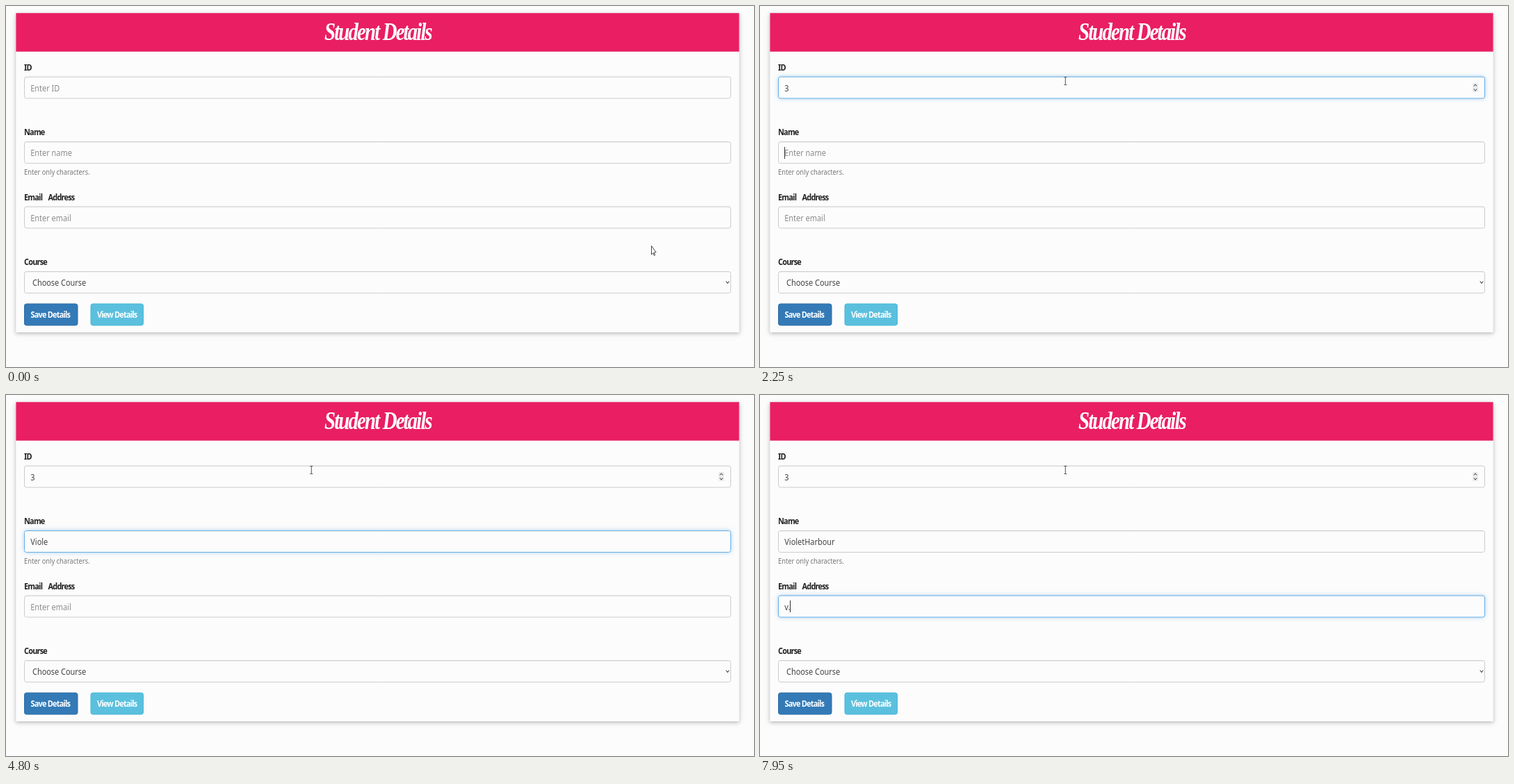
These frames come from a looping animation (1076x520 px, 8000 ms). An HTML page with a canvas:

```html
<!DOCTYPE html>
<html lang="en">
<head>
<meta charset="utf-8">
<title>Student Details</title>
<style>
html, body { margin: 0; width: 100%; height: 100%; overflow: hidden; background: #fcfcfc; }
canvas { display: block; }
</style>
</head>
<body>
<canvas id="stage" width="1076" height="520"></canvas>
<script>
const ctx = document.getElementById('stage').getContext('2d');
const LOOP = 8000, STEP = 50;
const PAGE = '#fcfcfc';
const SX = 0.78, SY = 0.94; // the whole page is shown slightly squeezed
const SANS = '"Noto Sans", "Open Sans", sans-serif';
const LEFT = 26, WIDTH = 1017;

const fields = [
  { label: 'ID', hint: 'Enter ID', top: 101.5, value: '3', times: [1750] },
  { label: 'Name', hint: 'Enter name', top: 195, value: 'VioletHarbour',
    times: [3300, 3550, 3750, 3900, 4350, 4950, 5300, 5600, 5800, 5900, 6000, 6200, 6300] },
  { label: 'Email Address', hint: 'Enter email', top: 288.5, value: 'v.', times: [7650, 7950] }
];

// field index, caret on, caret off
const carets = [
  [0, 900, 1400], [0, 1750, 2250],
  [1, 2250, 2800], [1, 3250, 4800], [1, 4950, 6600],
  [2, 6600, 7100], [2, 7600, LOOP]
];

function ramp(t, from, to) {
  const p = Math.min(1, Math.max(0, (t - from) / (to - from)));
  return p * p * (3 - 2 * p);
}

const mix = (a, b, p) => a + (b - a) * p;

function text(str, x, y, size, color, opt = {}) {
  ctx.save();
  ctx.translate(x, y);
  ctx.scale(SX, SY);
  ctx.font = `${opt.style || '400'} ${size}px ${opt.family || SANS}`;
  ctx.letterSpacing = opt.spacing || '0px';
  ctx.wordSpacing = opt.words || '0px';
  ctx.textAlign = opt.align || 'left';
  ctx.fillStyle = color;
  ctx.fillText(str, 0, 0);
  const width = ctx.measureText(str).width * SX;
  ctx.restore();
  return width;
}

function bold(str, x, y, color, words) {
  text(str, x, y, 14, color, { style: '600', spacing: '-1px', words });
}

const label = (str, y) => bold(str, LEFT, y, '#222', '8px');

function box(x, y, w, h, fill, stroke) {
  ctx.beginPath();
  ctx.roundRect(x + 0.5, y + 0.5, w - 1, h - 1, 3);
  ctx.fillStyle = fill;
  ctx.fill();
  ctx.strokeStyle = stroke;
  ctx.lineWidth = 1;
  ctx.stroke();
}

function shadow(color, blur, dy, paint) {
  ctx.save();
  ctx.shadowColor = color;
  ctx.shadowBlur = blur;
  ctx.shadowOffsetY = dy;
  paint();
  ctx.restore();
}

function line(points, color, width) {
  ctx.beginPath();
  points.forEach(([x, y]) => ctx.lineTo(x, y));
  ctx.strokeStyle = color;
  ctx.lineWidth = width;
  ctx.stroke();
}

function chevron(x, y, w, h, color) {
  line([[x - w, y], [x, y + h], [x + w, y]], color, 1.1);
}

function drawInput(top, glow) {
  if (glow > 0) {
    shadow(`rgba(102,175,233,${0.6 * glow})`, 6, 0, () => {
      ctx.beginPath();
      ctx.roundRect(LEFT + 0.5, top + 0.5, WIDTH - 1, 31, 3);
      ctx.fillStyle = PAGE;
      ctx.fill();
    });
  }
  const border = `rgb(${mix(204, 102, glow)},${mix(204, 175, glow)},${mix(204, 233, glow)})`;
  box(LEFT, top, WIDTH, 32, PAGE, border);
  ctx.fillStyle = 'rgba(0,0,0,0.04)';
  ctx.fillRect(LEFT + 2, top + 1, WIDTH - 4, 1);
}

function drawField(field, glow, caret, t) {
  const { top, value, times } = field;
  const typed = value.slice(0, times.filter(at => at <= t).length);
  label(field.label, top - 9);
  drawInput(top, glow);
  const base = top + 21.3;
  const width = text(typed, 35.3, base, 14, '#444');
  if (!typed) text(field.hint, 35.3, base, 14, '#8c8c8c');
  if (caret) {
    ctx.fillStyle = '#333';
    ctx.fillRect(Math.round(35.2 + width), Math.round(top + 7.5), 1, 17);
  }
}

function drawSpinner() {
  ctx.fillStyle = '#ececec';
  ctx.fillRect(1025, 111, 8, 13);
  chevron(1029, 115.5, 2.2, -2.5, '#555');
  chevron(1029, 119.5, 2.2, 2.5, '#555');
}

function drawCard() {
  const card = () => {
    ctx.fillStyle = PAGE;
    ctx.fillRect(14.4, 10, 1040.2, 460);
  };
  shadow('rgba(0,0,0,0.16)', 4.5, 2, card);
  shadow('rgba(0,0,0,0.12)', 9, 2, card);
  ctx.fillStyle = '#e91e63';
  ctx.fillRect(14.4, 10.2, 1040.2, 55.5);
  text('Student Details', 535, 49, 37, '#fff', {
    style: 'italic 700', family: '"Liberation Serif", serif', spacing: '-2.4px', align: 'center'
  });
}

function drawFooter() {
  label('Course', 372.5);
  drawInput(382, 0);
  text('Choose Course', 38, 403, 14, '#444');
  chevron(1038, 396.5, 2.3, 2.8, '#444');
  box(26, 428.5, 77.5, 32, '#337ab7', '#2e6da4');
  bold('Save Details', 35.5, 448.8, '#fff');
  box(121.5, 428.5, 76.5, 32, '#5bc0de', '#46b8da');
  bold('View Details', 131, 448.8, '#fff');
}

function drawArrow(x, y) {
  const shape = [[0, 0], [0, 12.6], [2.3, 10.2], [3.9, 14], [5.2, 13.3], [3.7, 9.6], [6.6, 9.4]];
  ctx.save();
  ctx.translate(x, y);
  ctx.beginPath();
  shape.forEach(([px, py]) => ctx.lineTo(px, py));
  ctx.closePath();
  ctx.fillStyle = '#fff';
  ctx.fill();
  ctx.strokeStyle = '#333';
  ctx.lineWidth = 0.9;
  ctx.lineJoin = 'round';
  ctx.stroke();
  ctx.restore();
}

function drawBeam(x, y) {
  ctx.fillStyle = '#555';
  ctx.fillRect(x - 0.5, y - 5, 1, 10);
  ctx.fillRect(x - 2, y - 6, 4, 1);
  ctx.fillRect(x - 2, y + 5, 4, 1);
}

function drawPointer(t) {
  if (t < 300) {
    const p = ramp(t, 100, 300);
    drawArrow(mix(928.5, 445, p), mix(345.5, 111, p));
  } else {
    const p = ramp(t, 400, 550);
    drawBeam(mix(445.5, 439.3, p), mix(112, 108, p));
  }
}

function draw(t) {
  ctx.fillStyle = PAGE;
  ctx.fillRect(0, 0, 1076, 520);
  drawCard();

  const enterId = ramp(t, 900, 1100);
  const toName = ramp(t, 2250, 2400);
  const toEmail = ramp(t, 6650, 6750);
  const glows = [enterId - toName, toName - toEmail, toEmail];
  const caret = carets.find(([, on, off]) => t >= on && t < off);
  fields.forEach((f, i) => drawField(f, glows[i], caret && caret[0] === i, t));

  text('Enter only characters.', LEFT, 243, 11.9, '#777');
  drawFooter();
  if (t >= 300) drawSpinner();
  drawPointer(t);
}

const start = performance.now();
function tick() {
  const t = (performance.now() - start) % LOOP;
  draw(Math.floor(t / STEP) * STEP);
  requestAnimationFrame(tick);
}
tick();
</script>
</body>
</html>
```
